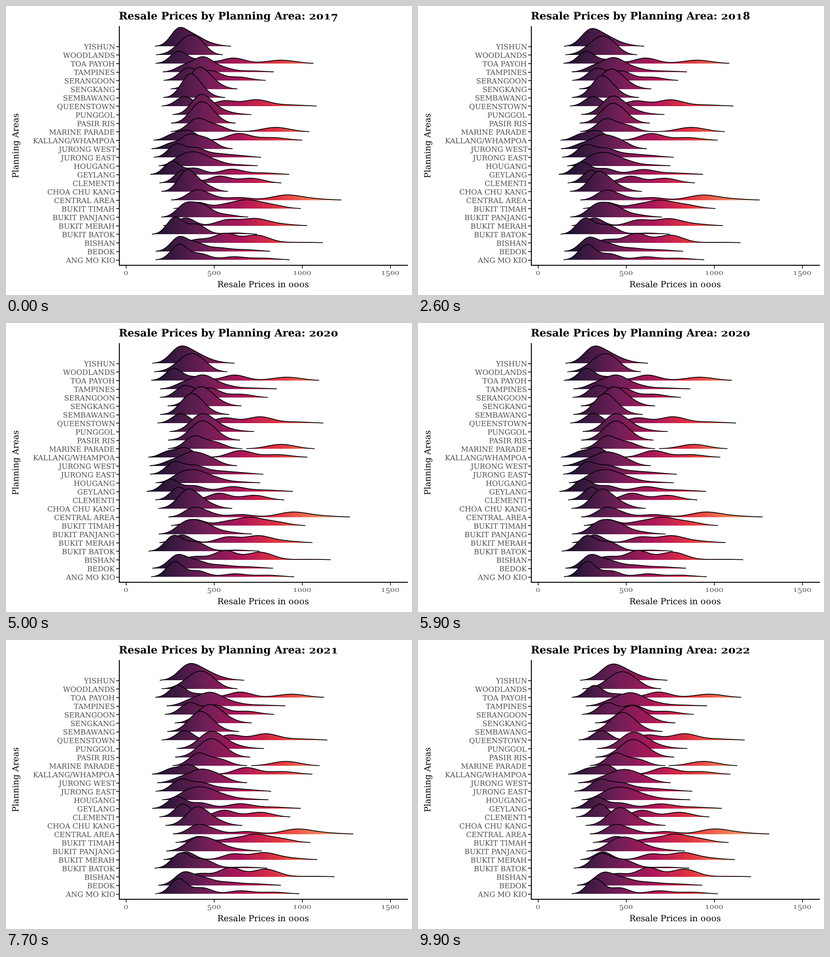
These frames come from a looping animation (885x632 px, 10 s). A matplotlib script:

```python
from itertools import groupby

import matplotlib.pyplot as plt
import numpy as np
from matplotlib.animation import FuncAnimation
from matplotlib.colors import LinearSegmentedColormap
from matplotlib.patches import PathPatch
from matplotlib.path import Path
from matplotlib.textpath import TextPath
from matplotlib.transforms import Affine2D

W, H, DPI = 885, 632, 100
PT = 72 / DPI                      # points per pixel
FRAMES, INTERVAL = 100, 100
TOP, ROW = 88.5, 18.68             # first baseline and row distance
AREA = 3000                        # every density covers the same area
CUT = 0.56                         # lower parts of a density are not drawn
LO, HI = 50, 1460                  # price range of the colour scale
GREY, TICK = "#4d4d4d", "#333333"

ROCKET = LinearSegmentedColormap.from_list("rocket", [
    "#03051a", "#35193e", "#701f57", "#ad1759",
    "#e13342", "#f37651", "#f6b48f", "#faebdd"])

fig = plt.figure(figsize=(W / DPI, H / DPI), dpi=DPI, facecolor="white")
ax = fig.add_axes([0, 0, 1, 1])
ax.set(xlim=(0, W), ylim=(H, 0))
ax.set_autoscale_on(False)
ax.axis("off")


def px(price):
    return 261.5 + 0.384 * price


# ---------------------------------------------------------------- lettering

def numeral_style(ch):
    return "low" if ch in "012" else "hang" if ch in "34579" else "plain"


def lettering(text, size, weight="normal", align=0.0):
    """Outline of a text with old-style numerals, y pointing down."""
    font = dict(family="DejaVu Serif", weight=weight)

    def shape(s):
        return TextPath((0, 0), s, size=size, prop=font)

    def edge(s):
        return shape(s).get_extents().xmax

    forms = {"low": Affine2D().scale(1, 0.72),
             "hang": Affine2D().translate(0, -0.2 * size),
             "plain": Affine2D()}
    parts, x = [], 0.0
    for style, run in groupby(text, numeral_style):
        run = "".join(run)
        move = forms[style] + Affine2D().translate(x, 0)
        parts.append(shape(run).transformed(move))
        x += edge(run + ".") - edge(".")
    place = Affine2D().translate(-align * x, 0).scale(1, -1)
    return Path.make_compound_path(*parts).transformed(place)


def write(x, y, text, size, align=0.0, color="black", angle=0):
    move = Affine2D().rotate_deg(-angle).translate(x, y)
    path = lettering(text, size, align=align).transformed(move)
    ax.add_patch(PathPatch(path, fc=color, lw=0, zorder=1))


# ------------------------------------------------------------------- ridges

price = np.linspace(90, 1450, 640)
ramp = np.linspace(0, 1, 1024)[None, :]
ridges = []


class Ridge:
    """Density of one area: bells at typical prices, weighted by share."""

    def __init__(self, base, order, bells):
        self.base = base
        self.centre, share = np.array(bells, float).T
        self.share = share / share.sum()
        costly = self.share[self.centre > 600].sum()
        self.youth = max(0, 1 - 5 * costly)   # new towns have few costly flats
        self.fill = ax.imshow(ramp, cmap=ROCKET, aspect="auto",
                              extent=(px(LO), px(HI), base, base - 64),
                              interpolation="nearest", zorder=5 + order)
        self.line, = ax.plot([], [], color="black", lw=1.7 * PT,
                             zorder=5.5 + order)

    def density(self, pos):
        """pos runs 0 (start) - 1 (lowest prices) - 2 (end)."""
        c, new = self.centre, self.youth
        dip = -5 * new + 0.1 * (c - 600) * (1 - new)
        rise = 110 * new + np.minimum(0.17 * (c - 170), 90) * (1 - new)
        shift = dip * pos if pos < 1 else dip + (rise - dip) * (pos - 1)
        spread = (28 + 0.06 * c) * (1 + 0.15 * new * pos)
        z = (price[:, None] - c - shift) / spread
        return np.exp(-0.5 * z ** 2) @ (AREA * self.share / spread)

    def update(self, pos):
        y = self.density(pos)
        seen = y >= CUT
        x = px(price)
        area = np.column_stack([x, self.base - np.where(seen, y, 0)])
        area = np.vstack([[x[0], self.base], area, [x[-1], self.base]])
        self.fill.set_clip_path(Path(area), ax.transData)
        self.line.set_data(x, np.where(seen, self.base - y, np.nan))


def ridge(name, *bells):
    """Add a row; each bell is (price in 2017, share in percent)."""
    n = len(ridges)
    base = TOP + ROW * n
    ax.plot([241, 247], [base, base], color=TICK, lw=1.9 * PT, zorder=1)
    write(237, base + 6.2, name, 15.7, align=1, color=GREY)
    ridges.append(Ridge(base, n, bells))


ridge("YISHUN", (298, 55), (385, 35), (475, 10))
ridge("WOODLANDS", (255, 4), (325, 36), (400, 60))
ridge("TOA PAYOH", (298, 40), (410, 14), (610, 26), (880, 20))
ridge("TAMPINES", (330, 20), (435, 55), (540, 19), (715, 6))
ridge("SERANGOON", (350, 43), (480, 40), (640, 17))
ridge("SENGKANG", (410, 72), (485, 28))
ridge("SEMBAWANG", (360, 75), (425, 25))
ridge("QUEENSTOWN", (333, 34), (560, 24), (740, 34), (930, 8))
ridge("PUNGGOL", (422, 71), (505, 24), (600, 5))
ridge("PASIR RIS", (405, 50), (465, 50))
ridge("MARINE PARADE", (400, 46), (505, 28), (850, 26))
ridge("KALLANG/WHAMPOA", (265, 17), (355, 34), (640, 33), (830, 16))
ridge("JURONG WEST", (250, 15), (355, 45), (455, 40))
ridge("JURONG EAST", (285, 42), (395, 34), (510, 14), (630, 10))
ridge("HOUGANG", (310, 28), (395, 42), (490, 24), (630, 6))
ridge("GEYLANG", (262, 42), (390, 24), (600, 25), (780, 9))
ridge("CLEMENTI", (325, 45), (530, 30), (710, 25))
ridge("CHOA CHU KANG", (345, 73), (440, 27))
ridge("CENTRAL AREA", (395, 32), (470, 17), (640, 13), (910, 30), (1060, 8))
ridge("BUKIT TIMAH", (405, 24), (560, 15), (680, 38), (810, 23))
ridge("BUKIT PANJANG", (335, 42), (430, 46), (560, 12))
ridge("BUKIT MERAH", (340, 28), (575, 26), (730, 36), (870, 10))
ridge("BUKIT BATOK", (278, 55), (400, 38), (620, 7))
ridge("BISHAN", (410, 13), (560, 42), (740, 41), (1000, 4))
ridge("BEDOK", (300, 46), (400, 30), (530, 15), (680, 9))
ridge("ANG MO KIO", (302, 51), (420, 24), (610, 15), (780, 10))


# --------------------------------------------------------- axes and headings

ax.plot([247, 247, 874.5], [45, 566.5, 566.5], color="black", lw=2 * PT,
        solid_joinstyle="miter", zorder=2)
for value in range(0, 1501, 500):
    x = px(value)
    ax.plot([x, x], [567, 572.5], color=TICK, lw=1.9 * PT, zorder=1)
    write(x, 588, str(value), 15.7, align=0.5, color=GREY)
write(560.5, 615, "Resale Prices in 000s", 18.4, align=0.5)
write(27, 305.5, "Planning Areas", 18.4, align=0.5, angle=90)

at_title = Affine2D().translate(246, 29.5)
titles = {year: lettering(f"Resale Prices by Planning Area: {year}", 22.8,
                          "bold").transformed(at_title)
          for year in range(2017, 2023)}
title = ax.add_patch(PathPatch(titles[2017], fc="black", lw=0, zorder=1))


# ------------------------------------------------------------------- motion

YEARS = np.arange(2017, 2023)
PROGRESS = [0, 0.7, 1, 1.15, 1.55, 2]   # a slow dip, then a faster climb


def draw(i):
    year = 2017 + 5 * i / (FRAMES - 1)
    title.set_path(titles[int(year + 0.5)])
    pos = np.interp(year, YEARS, PROGRESS)
    for r in ridges:
        r.update(pos)
    return []


anim = FuncAnimation(fig, draw, frames=FRAMES, interval=INTERVAL, repeat=True)
plt.show()
```
